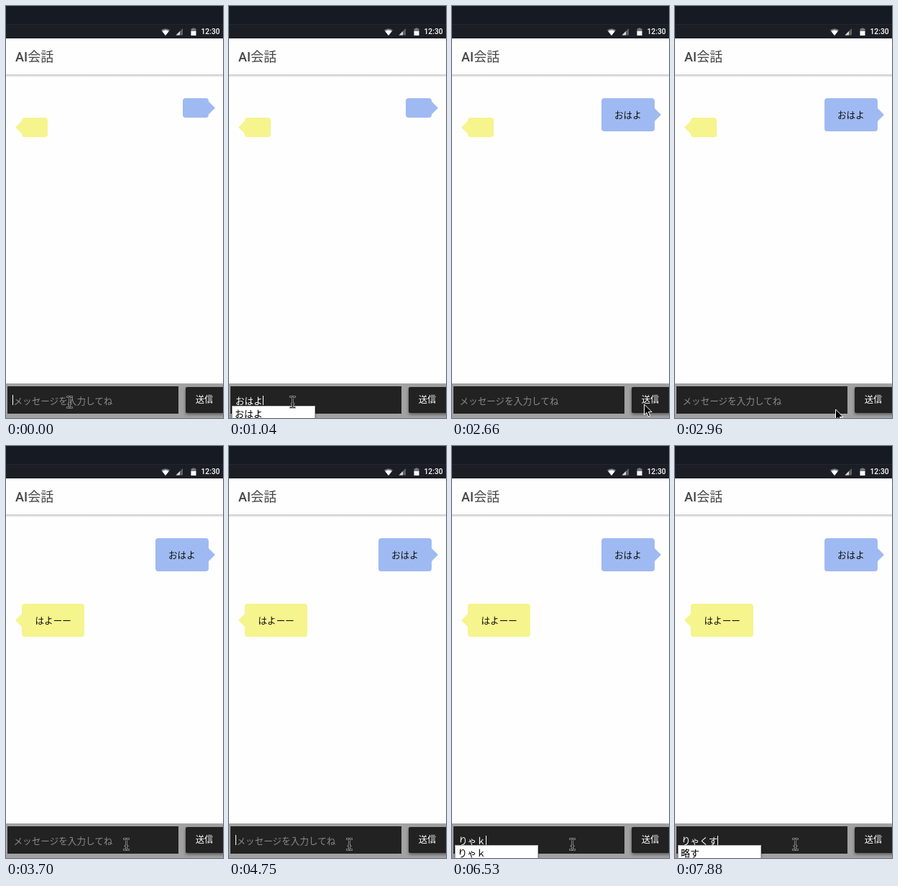
Write an HTML page that moves like this. It is 302x572 px and loops after 8000 ms.

```html
<!DOCTYPE html>
<html lang="ja">
<head>
<meta charset="utf-8">
<title>Chat</title>
<style>
  html, body { margin: 0; width: 100%; height: 100%; overflow: hidden; background: #fefefe; }
  svg { display: block; width: 100vw; height: 100vh; }
  text { font: 12.6px "Noto Sans CJK JP", "Noto Sans CJK", sans-serif; white-space: pre; }
  .latin { font-family: Roboto, sans-serif; font-weight: 500; }
  .title { font-size: 18px; fill: #444; }
  .me { fill: #9fbaf2; }
  .bot { fill: #f5f48d; }
  .button { filter: drop-shadow(0 2px 2px rgba(0, 0, 0, .45)); }
  .popup { filter: drop-shadow(0 1px 1.5px rgba(0, 0, 0, .5)); }
</style>
</head>
<body>
<svg viewBox="0 0 302 572">
  <defs>
    <linearGradient id="headerShadow" x2="0" y2="1">
      <stop offset="0" stop-color="#c4c4c4"/>
      <stop offset="1" stop-color="#fefefe"/>
    </linearGradient>
  </defs>

  <rect width="302" height="572" fill="#fefefe"/>
  <rect width="302" height="45" fill="#1b1e24"/>
  <rect width="302" height="25" fill="#151a23"/>
  <rect y="25" width="302" height="1" fill="#24282e"/>
  <g fill="#fff">
    <path d="M216 33.5Q222 29.5 228 33.5L222 41Z" fill="#777b80"/>
    <path d="M217.3 35Q222 32 226.7 35L222 41Z"/>
    <path d="M246 31V40.5H236.5Z" fill="#5d6166"/>
    <path d="M242 35V40.5H236.5Z" fill="#d8d8d8"/>
    <path d="M257.5 31.5H259.5V30.5H262.5V31.5H264.5V36H257.5Z" fill="#777b80"/>
    <rect x="257.5" y="35" width="7" height="6"/>
    <text class="latin" x="271.5" y="39.3" style="font-size:10.3px">12:30</text>
  </g>

  <text class="title latin" x="13" y="77">AI</text>
  <text class="title" x="30.3" y="77" style="font-weight:300">会話</text>
  <rect y="95" width="302" height="4" fill="url(#headerShadow)"/>

  <g class="me">
    <rect id="meBox" y="128" rx="4"/>
    <path id="meTip" d="M0-9L9 0L0 9Z"/>
    <text id="meText" x="226" y="155.5" fill="#111">おはよ</text>
  </g>
  <g class="bot">
    <rect id="botBox" x="22" rx="4"/>
    <path id="botTip" d="M0-9L-9 0L0 9Z"/>
    <text id="botText" x="40.5" y="246.5" fill="#111">はよーー</text>
  </g>

  <rect y="524" width="302" height="48" fill="#a2a2a2"/>
  <rect x="2" y="528" width="238" height="38" fill="#222"/>
  <rect class="button" x="250" y="529" width="56" height="36" rx="2" fill="#222"/>
  <text x="263.7" y="551" fill="#fff" style="font-size:12.3px">送信</text>
  <text id="hint" x="10.5" y="553" fill="#8a8a8a">メッセージを入力してね</text>
  <text id="typed" x="9" y="553" fill="#fff"></text>
  <rect id="caret" width="1" fill="#fff"/>

  <g id="popup">
    <rect class="popup" x="4.5" y="555.5" width="115" height="40" fill="#fff" stroke="#b5b5b5"/>
    <text id="candidate" x="8" y="571" fill="#000" style="font-size:13px"></text>
  </g>

  <g id="beam" fill="none" stroke-linecap="square">
    <path d="M-3-7.5H-1L0-6.5L1-7.5H3M0-6.5V6.5M-3 7.5H-1L0 6.5L1 7.5H3M-1.5 2.5H1.5" stroke="#999" stroke-width="2.6"/>
    <path d="M-3-7.5H-1L0-6.5L1-7.5H3M0-6.5V6.5M-3 7.5H-1L0 6.5L1 7.5H3M-1.5 2.5H1.5" stroke="#181818"/>
  </g>
  <path id="arrow" d="M0 0V14.5L3.4 11.4L5.8 17L8.2 16L5.8 10.5H10.5Z" fill="#000" stroke="#fff"/>
</svg>

<script>
const LOOP = 8000, EM = 12.6, SENT = 2520, REPLIED = 3400;

// Each track holds [start time, value...]; a value lasts until the next entry.
const typing = [
  [0, ''], [150, 'お'], [600, 'おｈ'], [750, 'おは'], [890, 'おはｙ'], [1040, 'おはよ'],
  [SENT, ''], [6240, 'ｒ'], [6390, 'りゃ'], [6530, 'りゃｋ'], [6830, 'りゃく'], [7880, 'りゃくす']
];
const candidates = [
  ...typing.slice(0, 6), [1340, ''], ...typing.slice(7, 10), [6830, '略'], [7880, '略す']
];
const carets = [
  [0, true], [1790, false], [3850, true], [4300, false], [4750, true],
  [5350, false], [5790, true], [7280, false], [7880, true]
];
const pointers = [
  [0, 88, 550, 'beam'], [1790, 112, 553, 'beam'], [1940, 192, 560, 'beam'],
  [2080, 250, 563, 'arrow'], [2230, 263, 556, 'arrow'], [2370, 267, 553, 'arrow'],
  [2810, 258, 557, 'arrow'], [2960, 223, 560, 'arrow'], [3110, 190, 557, 'beam'],
  [3260, 172, 554, 'beam'], [3400, 167, 553, 'beam']
];

const ui = Object.fromEntries([...document.querySelectorAll('[id]')].map(el => [el.id, el]));
const at = (track, t) => track.findLast(([start]) => start <= t).slice(1);
const show = (el, on) => el.setAttribute('visibility', on ? 'visible' : 'hidden');
const move = (el, x, y) => el.setAttribute('transform', `translate(${x} ${y})`);
const set = (el, attrs) => Object.entries(attrs).forEach(([k, v]) => el.setAttribute(k, v));

function drawBubbles(t) {
  const sent = t >= SENT, replied = t >= REPLIED;
  const meWidth = sent ? 74 : 36, meHeight = sent ? 46 : 27;
  set(ui.meBox, { x: 282 - meWidth, width: meWidth, height: meHeight });
  move(ui.meTip, 282, 128 + meHeight / 2);
  show(ui.meText, sent);

  const botTop = replied ? 219 : 155, botHeight = replied ? 46 : 27;
  set(ui.botBox, { y: botTop, width: replied ? 87 : 36, height: botHeight });
  move(ui.botTip, 22, botTop + botHeight / 2);
  show(ui.botText, replied);
}

function drawInput(t) {
  const [text] = at(typing, t), [candidate] = at(candidates, t), [caretOn] = at(carets, t);
  ui.typed.textContent = text;
  show(ui.hint, !text);
  show(ui.caret, caretOn);
  set(ui.caret, {
    x: Math.round(9 + text.length * EM),
    y: text ? 541 : 540,
    height: text ? 13 : 14
  });
  ui.candidate.textContent = candidate;
  show(ui.popup, candidate);
  move(ui.popup, 0, t < 6000 ? 0 : -1);
}

function drawPointer(t) {
  const [x, y, shape] = at(pointers, t);
  for (const id of ['beam', 'arrow']) {
    show(ui[id], id === shape);
    move(ui[id], x + .5, y);
  }
}

const begin = performance.now();
function draw() {
  const t = Math.max(0, performance.now() - begin) % LOOP;
  drawBubbles(t);
  drawInput(t);
  drawPointer(t);
  requestAnimationFrame(draw);
}
draw();
</script>
</body>
</html>
```
